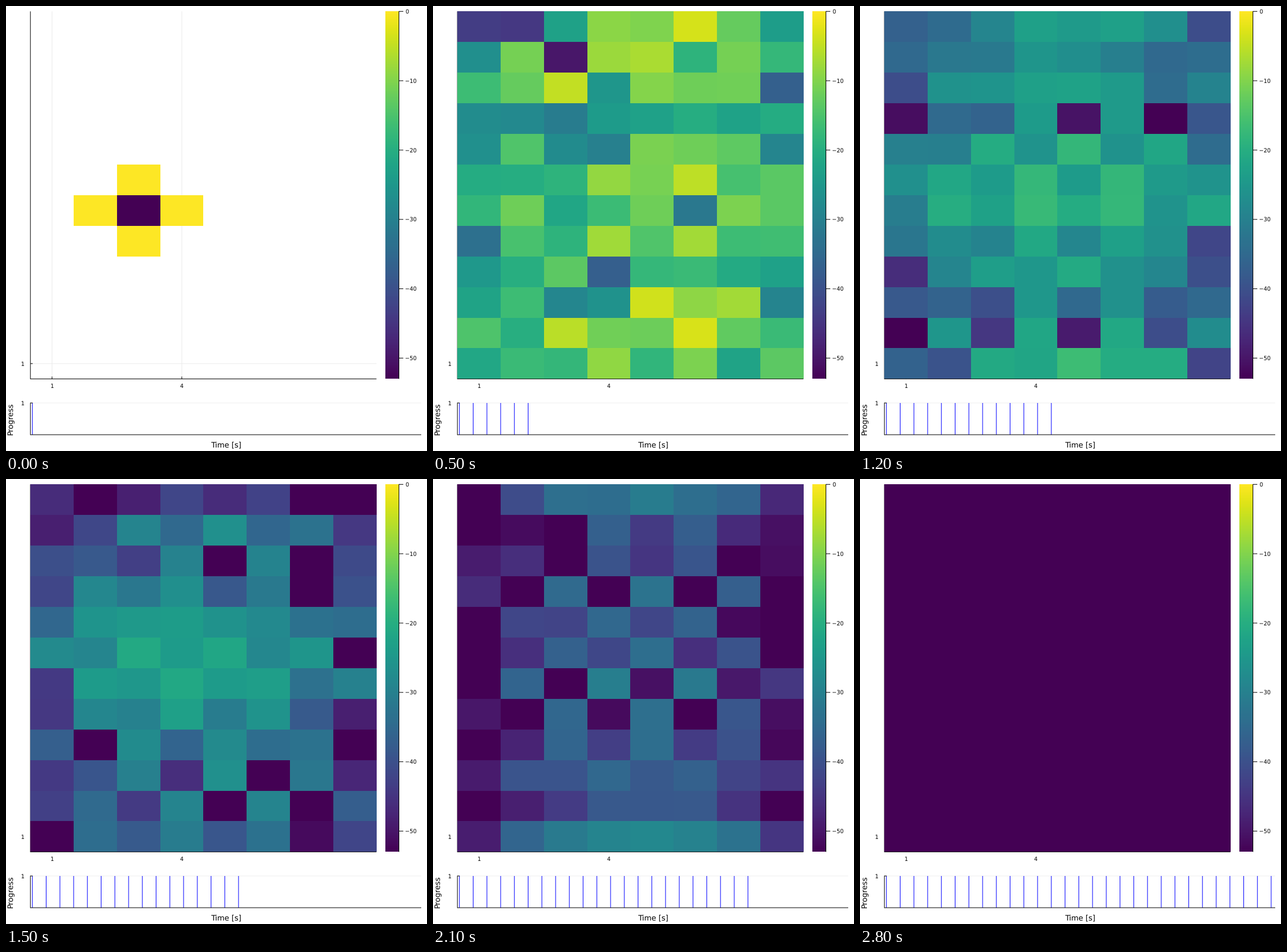
Write a matplotlib script that moves like this. It is 728 by 769 pixels and loops after 2.9 s.

```python
import numpy as np
import matplotlib.pyplot as plt
from matplotlib.animation import FuncAnimation

W, H, DPI = 728, 769, 64
PX = 72 / DPI                      # one pixel in points
ROWS, COLS = 12, 8
SRC = (6, 2)                       # row and column of the impulse
FLOOR = -53
FRAMES, STRIDE = 29, 7
SIDE_WALL, END_WALL = 0.2, 0.95    # reflection factors

LEFT, RIGHT, TOP, BOTTOM = 42.2, 640.6, 9.3, 644.4
CELL_W, CELL_H = (RIGHT - LEFT) / COLS, (BOTTOM - TOP) / ROWS

# Typical level in dB at a few steps of the decay
DECAY_STEPS = [1, 8, 36, 64, 106, 134, 169, 197]
DECAY_LEVELS = [0, -8, -17, -18.5, -35, -37.5, -53, -66]


def simulate(steps):
    """Levels in dB of a transmission-line mesh, one field per step."""
    inc = np.zeros((4, ROWS, COLS))          # from north, south, west, east
    inc[:, SRC[0], SRC[1]] = 1
    levels = []
    for _ in range(steps):
        out = inc.sum(0) / 2 - inc
        inc = np.concatenate([END_WALL * out[:2], SIDE_WALL * out[2:]])
        inc[0, 1:] = out[1, :-1]
        inc[1, :-1] = out[0, 1:]
        inc[2, :, 1:] = out[3, :, :-1]
        inc[3, :, :-1] = out[2, :, 1:]
        levels.append(20 * np.log10(np.abs(inc.sum(0)) + 1e-9))
    return levels


levels = simulate(1 + STRIDE * (FRAMES - 1))
row, col = np.indices((ROWS, COLS))
distance = abs(row - SRC[0]) + abs(col - SRC[1])


def field_at(step):
    """Visible levels; cells the wave has not reached stay empty."""
    field = levels[step - 1]
    middle = np.median(field[field > -120])
    field = field - middle + np.interp(step, DECAY_STEPS, DECAY_LEVELS)
    return np.ma.masked_where(distance > step, np.clip(field, FLOOR, 0))


plt.rcParams["text.hinting"] = "none"
fig = plt.figure(figsize=(W / DPI, H / DPI), dpi=DPI, facecolor="white")
ax = fig.add_axes([0, 0, 1, 1])
ax.axis("off")


def line(x0, y0, x1, y1, color="black", z=1):
    ax.plot([x0, x1], [y0, y1], color=color, lw=PX, zorder=z,
            solid_capstyle="butt", snap=False)


def label(x, y, text, size=9.5, **kw):
    ax.text(x, y, text, fontsize=size * PX, family="DejaVu Sans",
            va="baseline", **kw)


def mesh(x0, x1, y0, y1, data, low, high):
    rows, cols = data.shape
    return ax.pcolormesh(np.round(np.linspace(x0, x1, cols + 1)),
                         np.round(np.linspace(y0, y1, rows + 1)), data,
                         cmap="viridis", vmin=low, vmax=high, zorder=2)


GRID = "#ebebeb"
x1, x4 = LEFT + CELL_W / 2, LEFT + 3.5 * CELL_W
y1 = BOTTOM - CELL_H / 2

# Room plot: grid, axes and ticks lie under the cells
for x, text in ((x1, "1"), (x4, "4")):
    line(x, TOP, x, BOTTOM, GRID)
    line(x, BOTTOM - 4, x, BOTTOM)
    label(x, 659.6, text, ha="center")
line(LEFT, y1, RIGHT, y1, GRID)
line(LEFT, y1, LEFT + 4, y1)
line(LEFT, TOP, LEFT, BOTTOM + 0.5)
line(LEFT, BOTTOM, RIGHT, BOTTOM)
label(28.5, 621.6, "1", ha="center")
cells = mesh(LEFT, RIGHT, TOP, BOTTOM, field_at(1), FLOOR, 0)

# Colour bar
mesh(656, 679.5, TOP, BOTTOM, np.linspace(1, 0, 256)[:, None], 0, 1)
line(679.5, TOP, 679.5, BOTTOM, z=3)
for level in range(0, -51, -10):
    y = TOP + (BOTTOM - TOP) * level / FLOOR
    line(679, y, 687, y, z=3)
    label(690, y + 3.5, str(level).replace("-", "\u2212"), ha="left")

# Progress plot
P_TOP, P_BOTTOM = 686, 740.9
line(LEFT, P_TOP, 718, P_TOP, "#f0f0f0")
line(LEFT, P_TOP - 0.5, LEFT, P_BOTTOM + 0.5, z=3)
line(LEFT, P_BOTTOM, 718, P_BOTTOM, z=3)
line(LEFT, P_TOP, LEFT + 4, P_TOP, z=3)
label(28.5, 689.6, "1", ha="center")
label(380.5, 763.5, "Time [s]", 13, ha="center")
label(12, 713, "Progress", 13, ha="center", rotation=90, rotation_mode="anchor")
marks = ax.vlines([45.7], P_TOP, P_BOTTOM, color="blue", lw=PX, zorder=2,
                  snap=False)

ax.set_xlim(0, W)
ax.set_ylim(H, 0)


def update(i):
    cells.set_array(field_at(1 + STRIDE * i))
    marks.set_segments([[(x, P_TOP), (x, P_BOTTOM)]
                        for x in 45.7 + 23.76 * np.arange(i + 1)])
    return cells, marks


anim = FuncAnimation(fig, update, frames=FRAMES, interval=100,
                     repeat=True, repeat_delay=0)
plt.show()
```
